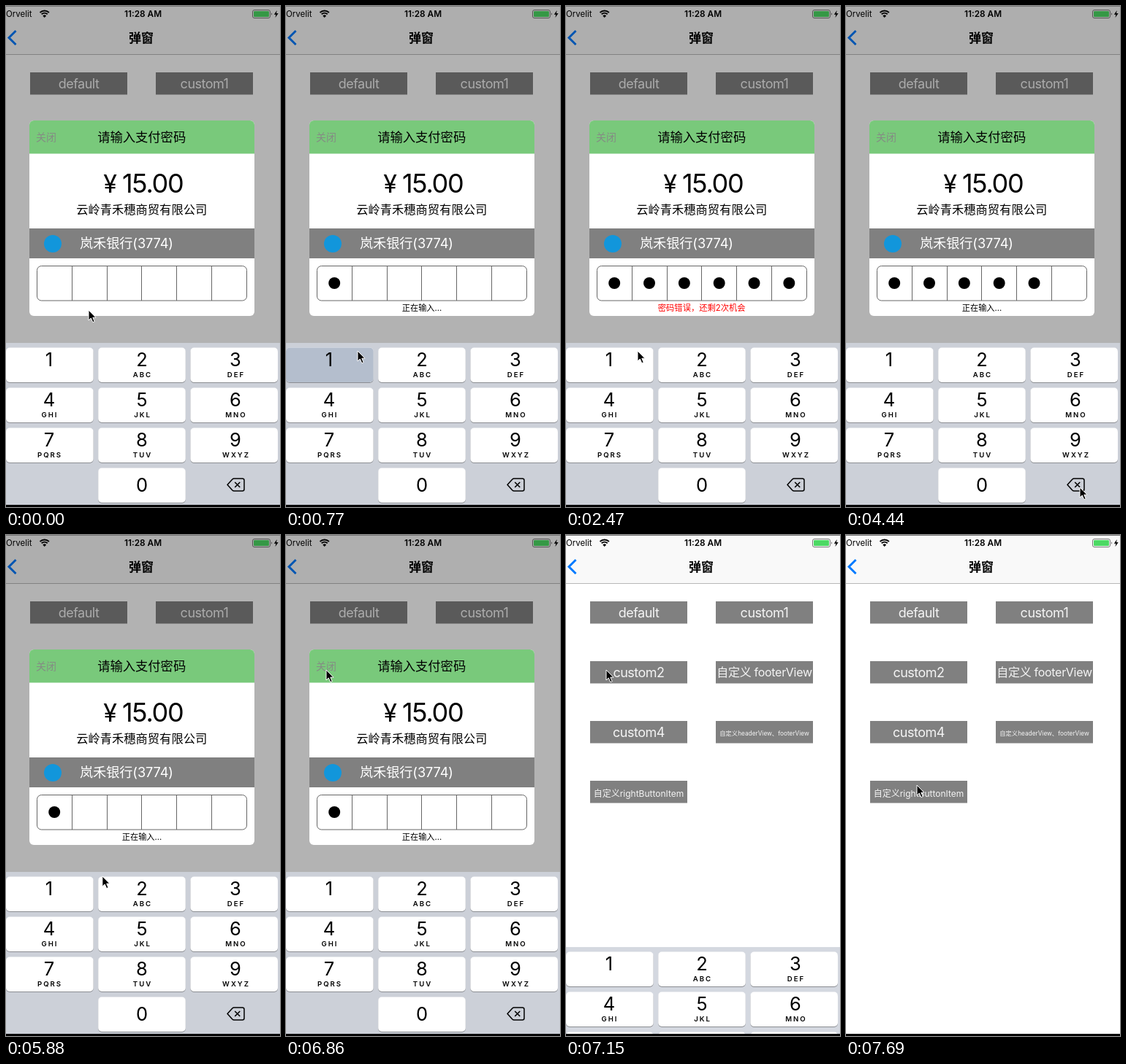
Recreate the animation shown at these times as an HTML page. Size 375x687 px, loop 8000 ms.

```html
<!DOCTYPE html>
<html lang="zh-CN">
<head>
<meta charset="utf-8">
<title>弹窗</title>
<style>
  html, body { margin: 0; width: 100%; height: 100%; overflow: hidden; background: #fff; }
  svg { display: block; width: 100vw; height: 100vh; }
  text { font-family: Inter, "Noto Sans CJK SC", "Noto Sans CJK", sans-serif; white-space: pre; }
</style>
</head>
<body>
<svg id="stage" viewBox="0 0 375 687"></svg>
<script>
const LOOP = 8000;

// Each row: time, x, y of the pointer tip; straight moves in between.
const POINTER = [
  [0, 113, 417], [20, 113, 417], [170, 98, 473],
  [2970, 98, 473], [3190, 309, 636], [3330, 309, 636], [3490, 323, 660],
  [4420, 323, 660], [4440, 320, 660], [5270, 320, 660], [5480, 140, 522],
  [5740, 140, 522], [5880, 132, 469], [6110, 101, 213],
  [6290, 101, 213], [6590, 55, 185], [7250, 55, 185], [7630, 97, 343]
];
// Time and number of digits entered from then on.
const DIGITS = [
  [0, 0], [590, 1], [830, 2], [950, 3], [1070, 4], [1190, 5], [1350, 6],
  [3730, 5], [4500, 4], [4680, 3], [4860, 2], [5050, 1]
];
const KEY_PRESSES = [[470, 590], [770, 830], [890, 950], [1010, 1070], [1130, 1190], [1290, 1350]];
const KEY_FADE = 220;
const DELETE_PRESSES = [[3730, 3910], [4500, 4600], [4680, 4780], [4860, 4970], [5050, 5190]];
const ERROR_SPAN = [2470, 3730];
const CLOSE = { at: 6860, length: 180 };
const KEYBOARD_HIDE = { at: 7060, length: 630, distance: 222 };

const rect = (x, y, w, h, fill, more = '') =>
  `<rect x="${x}" y="${y}" width="${w}" height="${h}" fill="${fill}" ${more}/>`;
const text = (s, x, y, size, { fill = '#000', anchor = 'middle', weight = 400, gap = 0, id = '' } = {}) =>
  `<text ${id && `id="${id}"`} x="${x}" y="${y}" font-size="${size}" fill="${fill}" text-anchor="${anchor}"
    font-weight="${weight}" letter-spacing="${gap}">${s}</text>`;
const line = (d, color, width, more = '') =>
  `<path d="${d}" fill="none" stroke="${color}" stroke-width="${width}" ${more}/>`;

const statusBar = () =>
  text('Orvelit', 0, 15, 11.5, { anchor: 'start' }) +
  line('M46.5 9a9.2 9.2 0 0 1 12.4 0M48.7 11.3a6 6 0 0 1 8 0', '#000', 2) +
  '<path d="M52.7 16l-2.4-2.6a3.6 3.6 0 0 1 4.8 0z"/>' +
  text('11:28 AM', 187.5, 15.3, 11.8, { weight: 600 }) +
  rect(337.5, 5.5, 24, 11, 'none', 'rx="2.5" stroke="#777"') +
  rect(339, 7, 21, 8, '#4cd964', 'rx="1.2"') +
  '<path d="M363 9.3q2.4 1.7 0 3.4z" fill="#777"/>' +
  '<path d="M370.8 6l-4 5.7h2.6l-.9 4.3 4.2-6h-2.7z"/>';

const navBar = () =>
  rect(0, 0, 375, 66, '#f9f9f9') + rect(0, 66, 375, 1, '#b8b8b8') +
  line('M13.5 34L4 43.5L13.5 53', '#007aff', 3) +
  text('弹窗', 185, 50, 17, { weight: 600 });

const BUTTONS = [
  ['default', 0, 0, 18, -.5], ['custom1', 1, 0, 18, -.5],
  ['custom2', 0, 1, 18, -.5], ['自定义 footerView', 1, 1, 16, -.3],
  ['custom4', 0, 2, 18, -.5], ['自定义headerView、footerView', 1, 2, 8.3, 0],
  ['自定义rightButtonItem', 0, 3, 12, 0]
];
const buttons = () => BUTTONS.map(([label, col, row, size, gap]) => {
  const x = 33 + col * 172, y = 91 + row * 82;
  return rect(x, y, 133, 30.5, '#808080') +
    text(label, x + 66.5, y + 15.7 + size * .36 + (size < 16 ? 1.5 : 0), size, { fill: '#f4f4f4', gap });
}).join('');

const boxX = i => 42.5 + i * 47.83;
const panel = () =>
  '<clipPath id="round"><rect x="32" y="157" width="308" height="268" rx="6"/></clipPath>' +
  '<g id="panel"><g clip-path="url(#round)">' +
  rect(32, 157, 308, 268, '#fff') + rect(32, 157, 308, 45.5, '#79c97b') +
  rect(32, 305, 308, 41, '#808080') + '</g>' +
  text('关闭', 41, 185, 14, { anchor: 'start', fill: '#848c84' }) +
  text('请输入支付密码', 185.7, 186, 17.3, { weight: 500 }) +
  text('¥', 142.5, 256, 34) +
  text('15.00', 159, 256, 36, { anchor: 'start', gap: -1.3 }) +
  text('云岭青禾穗商贸有限公司', 185.7, 285, 16.3) +
  '<circle cx="64" cy="326" r="12" fill="#1296db"/>' +
  text('岚禾银行(3774)', 101, 332, 18.2, { anchor: 'start', fill: '#fff', gap: -.1 }) +
  rect(42.5, 356.5, 287, 47.5, 'none', 'rx="6" stroke="#666"') +
  [1, 2, 3, 4, 5].map(i => line(`M${Math.floor(boxX(i)) + .5} 356.5v47.5`, '#666', 1)).join('') +
  [0, 1, 2, 3, 4, 5].map(i => `<circle class="dot" cx="${boxX(i) + 23.7}" cy="380" r="8"/>`).join('') +
  text('正在输入...', 186, 418, 11.2, { id: 'typing' }) +
  text('密码错误，还剩2次机会', 185.7, 418, 11.3, { id: 'error', fill: '#f00' }) +
  '</g>';

const KEYS = ['1', '2ABC', '3DEF', '4GHI', '5JKL', '6MNO', '7PQRS', '8TUV', '9WXYZ', '', '0'];
const key = (label, i) => {
  if (!label) return '';
  const col = i % 3, row = Math.floor(i / 3);
  const x = col * 126.2, y = 468.5 + row * 55, mid = [59, 186, 314][col];
  return rect(x, y + 1, 119.6, 47.5, '#8b8d92', 'rx="5"') +
    rect(x, y, 119.6, 47.5, '#fff', 'rx="5"') +
    (i ? '' : rect(x, y, 119.6, 47.5, '#b4becd', 'rx="5" id="pressed"')) +
    text(label[0], mid, y + (label === '0' ? 32 : 25.5), 25.5) +
    text(label.slice(1), mid + 1, y + 40.3, 9.6, { weight: 600, gap: 2 });
};
const keyboard = () =>
  '<g id="keyboard">' + rect(0, 462, 375, 226, 'rgba(208,212,221,.9)') + KEYS.map(key).join('') +
  '<path id="delete" d="M303 656.5L309.8 649q1-1 2.4-1H323.500q2.500 0 2.500 2.500V662.500q0 2.500-2.500 2.500H312.200q-1.400 0-2.400-1z" stroke="#000" stroke-width="1.5" stroke-linejoin="round"/>' +
  line('M313.200 653l7 7m0-7l-7 7', '#000', 1.6, 'id="cross"') + '</g>';

const pointer = () =>
  '<path id="pointer" d="M0 0V14L3.300 11L5.800 16.700L8.200 15.700L5.800 10.200H10z" stroke="#fff" stroke-width="1" stroke-linejoin="round"/>';

const $ = id => document.getElementById(id);
$('stage').innerHTML =
  rect(0, 0, 375, 687, '#fff') + navBar() + statusBar() + buttons() +
  rect(0, 0, 375, 687, '#000', 'id="shade"') + panel() + keyboard() +
  rect(0, 0, 375, 1, '#777') + rect(0, 684, 375, 3, '#000') + pointer();
const dots = [...document.querySelectorAll('.dot')];

const clamp = v => Math.max(0, Math.min(1, v));
const progress = (t, { at, length }) => clamp((t - at) / length);
const within = (t, [from, to]) => t >= from && t < to;
const show = (el, on) => el.setAttribute('visibility', on ? 'visible' : 'hidden');
const fade = (el, v) => el.setAttribute('opacity', v);
const move = (el, x, y) => el.setAttribute('transform', `translate(${x} ${y})`);

function pointerAt(t) {
  const next = POINTER.findIndex(p => p[0] > t);
  if (next < 0) return POINTER.at(-1).slice(1);
  const [t0, x0, y0] = POINTER[next - 1], [t1, x1, y1] = POINTER[next];
  const k = (t - t0) / (t1 - t0);
  return [x0 + (x1 - x0) * k, y0 + (y1 - y0) * k];
}

function keyGlow(t) {
  const press = KEY_PRESSES.findLast(p => p[0] <= t);
  return press ? 1 - clamp((t - press[1]) / KEY_FADE) : 0;
}

function render(t) {
  const count = DIGITS.findLast(d => d[0] <= t)[1];
  const wrong = within(t, ERROR_SPAN);
  dots.forEach((dot, i) => show(dot, i < count));
  show($('typing'), count > 0 && !wrong);
  show($('error'), wrong);
  fade($('pressed'), keyGlow(t));

  const deleting = DELETE_PRESSES.some(p => within(t, p));
  $('delete').setAttribute('fill', deleting ? '#000' : 'none');
  $('cross').setAttribute('stroke', deleting ? '#d0d4dc' : '#000');

  const k = progress(t, CLOSE), closed = k * k * (3 - 2 * k);
  const scale = 1 - closed / 2;
  fade($('shade'), .3 * (1 - closed));
  fade($('panel'), 1 - closed);
  $('panel').setAttribute('transform', `translate(186 291) scale(${scale}) translate(-186 -291)`);

  const hidden = 1 - (1 - progress(t, KEYBOARD_HIDE)) ** 4;
  move($('keyboard'), 0, hidden * KEYBOARD_HIDE.distance);
  move($('pointer'), ...pointerAt(t));
}

const start = performance.now();
function tick() {
  render((performance.now() - start) % LOOP);
  requestAnimationFrame(tick);
}
tick();
</script>
</body>
</html>
```
